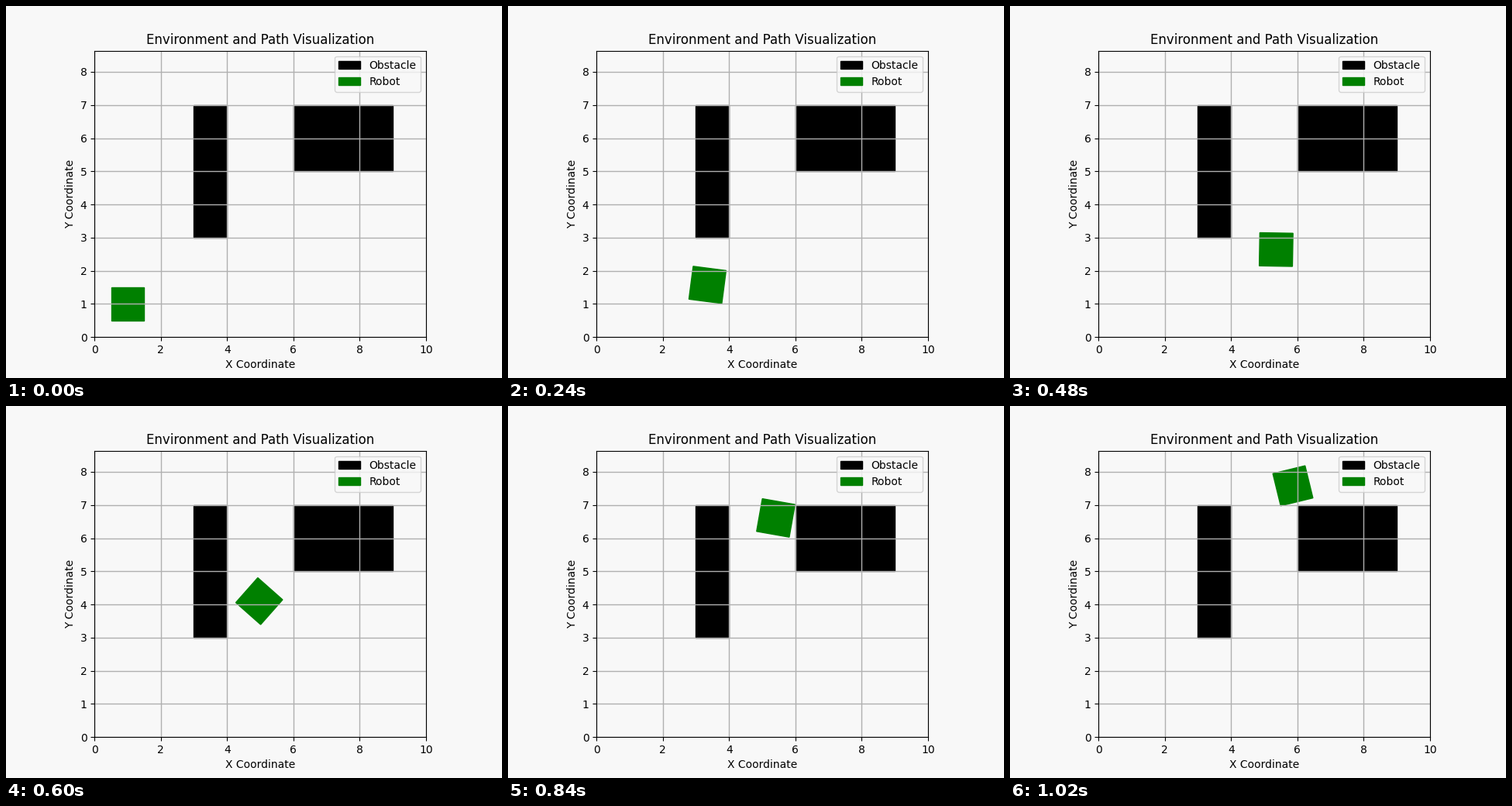
A matplotlib script for the animation above (1080 ms loop, 640 by 480 pixels).

```python
import numpy as np
import matplotlib.pyplot as plt
from matplotlib.animation import FuncAnimation
from matplotlib.patches import Patch, Rectangle

FRAMES, INTERVAL = 18, 60
BACKGROUND = "#f8f8f8"
SIZE = 1.0

# Turning points of the path: step -> (centre x, centre y, heading)
TURNS = {
    0: (1.0, 1.0, 0),
    2: (2.73, 1.37, -24.8),
    6: (3.97, 1.78, 10),
    8: (5.36, 2.64, -1),
    9: (4.71, 3.34, -15.5),
    10: (4.97, 4.1, -41.5),
    14: (5.41, 6.61, -10),
    17: (5.865, 7.58, 13.7),
}


def pose(step):
    """Glide in a straight line from one turning point to the next."""
    return [np.interp(step, list(TURNS), values) for values in zip(*TURNS.values())]


def add_box(x, y, width, height, color):
    box = Rectangle((x, y), width, height, rotation_point="center", color=color)
    return ax.add_patch(box)


fig, ax = plt.subplots(figsize=(6.4, 4.8), dpi=100, facecolor=BACKGROUND)
ax.set(
    facecolor=BACKGROUND, xlim=(0, 10), ylim=(0, 8.64), aspect="equal",
    title="Environment and Path Visualization",
    xlabel="X Coordinate", ylabel="Y Coordinate",
)
ax.grid(True, linewidth=1)

add_box(3, 3, 1, 4, "black")
add_box(6, 5, 3, 2, "black")
robot = add_box(0.5, 0.5, SIZE, SIZE, "green")

ax.legend(
    handles=[Patch(color="black", label="Obstacle"),
             Patch(color="green", label="Robot")],
    loc="upper right", facecolor=BACKGROUND,
)


def update(step):
    x, y, heading = pose(step)
    robot.set_xy((x - SIZE / 2, y - SIZE / 2))
    robot.set_angle(heading)
    return (robot,)


anim = FuncAnimation(fig, update, frames=FRAMES, interval=INTERVAL, repeat=True)
plt.show()
```
